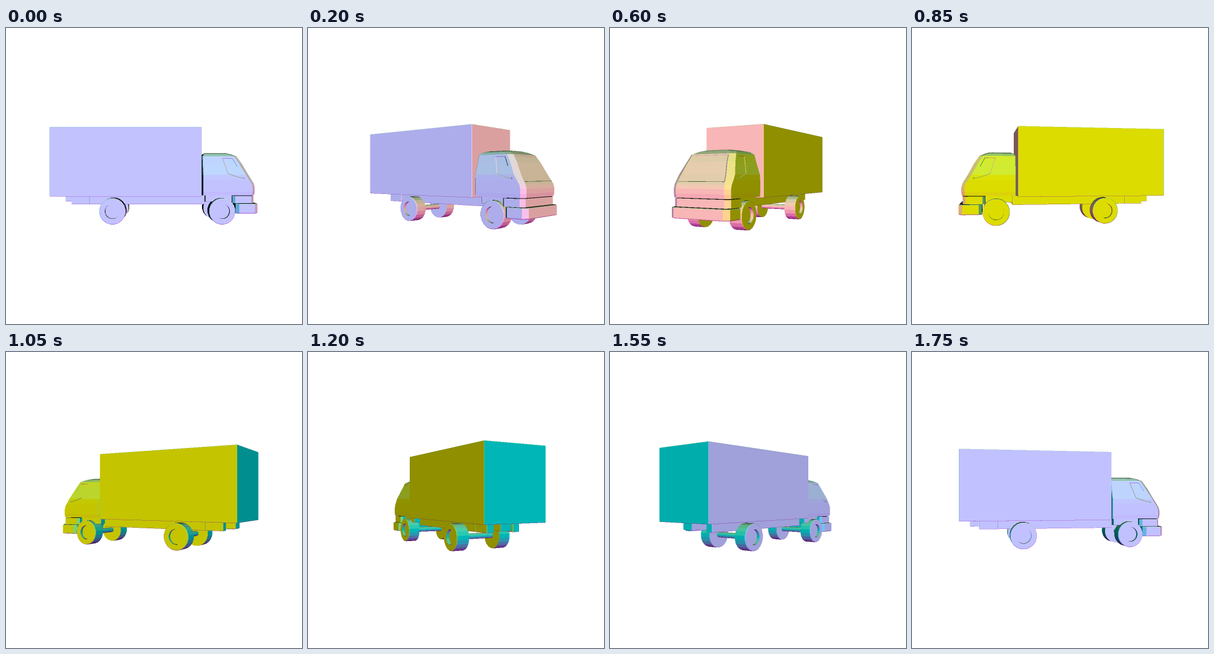
Recreate the animation shown at these times as an HTML page with a canvas. Size 512x512 px, loop 1800 ms.

```html
<!DOCTYPE html>
<html lang="en">
<head>
<meta charset="utf-8">
<title>Turning truck</title>
<style>
html, body { margin: 0; width: 100%; height: 100%; overflow: hidden; background: #fff; }
canvas { display: block; width: 512px; height: 512px; }
</style>
</head>
<body>
<canvas id="stage" width="512" height="512"></canvas>
<script>
const SIZE = 512, SS = 2, TOP = 130, ROWS = 240, DIST = 715;
const STEPS = 36, STEP_MS = 50;
const W = SIZE * SS, H = ROWS * SS;
const ctx = document.getElementById('stage').getContext('2d');
const depth = new Float32Array(W * H);
const color = new Uint32Array(W * H);
const faces = [];

// Model space: x to the front, y down, z to the right-hand side.
const dot = (a, b) => a[0] * b[0] + a[1] * b[1] + a[2] * b[2];
const sub = (a, b) => a.map((v, i) => v - b[i]);
const mul = (a, k) => a.map(v => v * k);
const sum = (a, b) => a.map((v, i) => v + b[i]);
const unit = a => mul(a, 1 / (Math.hypot(...a) || 1));
const cross = (a, b) => [
  a[1] * b[2] - a[2] * b[1],
  a[2] * b[0] - a[0] * b[2],
  a[0] * b[1] - a[1] * b[0]
];
const middle = pts => mul(pts.reduce(sum), 1 / pts.length);
const lerp = (a, b, t) => a + (b - a) * t;

function polyNormal(pts) {
  let n = [0, 0, 0];
  pts.forEach((p, i) => { n = sum(n, cross(p, pts[(i + 1) % pts.length])); });
  return unit(n);
}

// Adds a face whose normal points away from the inner point (or towards it).
function add(pts, inner, sign = 1) {
  const n = polyNormal(pts);
  const out = dot(n, sub(middle(pts), inner)) * sign;
  faces.push({ pts, n: out < 0 ? mul(n, -1) : n });
}

function box(x0, x1, y0, y1, z0, z1, bevel = 0.5) {
  const c = [(x0 + x1) / 2, (y0 + y1) / 2, (z0 + z1) / 2];
  const h = [(x1 - x0) / 2, (y1 - y0) / 2, (z1 - z0) / 2];
  const corner = (s, axis) => s.map((k, i) => c[i] + k * (h[i] - (i === axis ? 0 : bevel)));
  const ends = [-1, 1];
  for (let a = 0; a < 3; a++) {
    const u = (a + 1) % 3, w = (a + 2) % 3;
    const at = (i, j, k, axis) => {
      const s = [];
      s[a] = i; s[u] = j; s[w] = k;
      return corner(s, axis);
    };
    for (const i of ends) {
      add([at(i, -1, -1, a), at(i, 1, -1, a), at(i, 1, 1, a), at(i, -1, 1, a)], c);
      for (const j of ends)
        add([at(i, j, -1, a), at(i, j, 1, a), at(i, j, 1, u), at(i, j, -1, u)], c);
    }
  }
  for (const i of ends) for (const j of ends) for (const k of ends)
    add([0, 1, 2].map(axis => corner([i, j, k], axis)), c);
}

// Levels: [y, side z, side end x, front x, front z, back x]
function loft(levels, cut) {
  const rings = levels.map(([y, zs, xs, xf, zf, xb]) => {
    const half = [[xb, y, zs - cut], [xb + cut, y, zs], [xs, y, zs], [xf, y, zf]];
    return half.concat(half.map(([x, , z]) => [x, y, -z]).reverse());
  });
  const c = middle(rings.map(middle));
  rings.slice(1).forEach((ring, r) => {
    const low = rings[r];
    ring.forEach((p, i) => {
      const j = (i + 1) % ring.length;
      add([low[i], low[j], ring[j], p], c);
    });
  });
  add(rings[0], c);
  add(rings[rings.length - 1], c);
}

function wheel(x, side) {
  const y = 57, R = 21.4, rim = 12.2, N = 20;
  const c = [x, y, 36 * side];
  const at = (r, i, z) => {
    const a = (i + 0.5) * 2 * Math.PI / N;
    return [x + r * Math.cos(a), y + r * Math.sin(a), z * side];
  };
  const band = (r0, z0, r1, z1, sign) => {
    for (let i = 0; i < N; i++)
      add([at(r0, i, z0), at(r0, i + 1, z0), at(r1, i + 1, z1), at(r1, i, z1)], c, sign);
  };
  const disc = (r, z) => add(Array.from({ length: N }, (_, i) => at(r, i, z)), c);
  band(R, 28, R, 48.3);
  band(R, 48.3, R - 0.8, 49);
  band(R - 0.8, 49, rim, 49);
  band(rim, 49, rim, 44, -1);
  disc(rim, 44);
  disc(R, 28);
}

function axle(x) {
  const N = 12, r = 4.5, c = [x, 57, 0];
  const at = (i, z) => [x + r * Math.cos(i * 2 * Math.PI / N), 57 + r * Math.sin(i * 2 * Math.PI / N), z];
  for (let i = 0; i < N; i++) add([at(i, -28), at(i + 1, -28), at(i + 1, 28), at(i, 28)], c);
}

// Thin recessed rim around a window.
function rimLine(pts, outward, width) {
  let n = polyNormal(pts);
  if (dot(n, outward) < 0) n = mul(n, -1);
  const c = middle(pts);
  pts.forEach((p, i) => {
    const q = pts[(i + 1) % pts.length];
    let inward = unit(cross(n, sub(q, p)));
    if (dot(inward, sub(c, p)) < 0) inward = mul(inward, -1);
    const shift = mul(inward, width);
    faces.push({ pts: [p, q, sum(q, shift), sum(p, shift)], n: unit(sum(mul(n, 0.6), mul(inward, 0.8))) });
  });
}

const cab = [
  [31, 49.5, 158, 163, 41.5, 79],
  [25, 50, 158.5, 164, 42, 79],
  [18, 50, 158.5, 164, 42, 79],
  [12, 50, 157, 162.3, 42, 79],
  [6, 50, 153, 158.7, 41.5, 79],
  [-2, 49.5, 148, 154, 40, 79],
  [-20, 43.5, 138, 144.5, 35.5, 79],
  [-32, 40, 130.5, 136.5, 33, 79],
  [-36, 34, 121, 128, 28, 82],
  [-38.5, 20, 115, 121, 16, 86]
];

function cabAt(y, column) {
  const i = cab.findIndex((l, k) => k && l[0] <= y);
  const a = cab[i - 1], b = cab[i];
  return lerp(a[column], b[column], (y - a[0]) / (b[0] - a[0]));
}

function buildTruck() {
  box(-166.9, 76.3, -78.6, 32.8, -53.6, 53.6);
  loft(cab, 1);
  loft([[44, 49, 157, 162, 41, 127], [32, 49, 157, 162, 41, 127]], 4);
  loft([[60.5, 50, 161, 167, 42, 132], [59.5, 51, 162, 168, 43, 132],
        [45.5, 51, 162, 168, 43, 132], [44.5, 50, 161, 167, 42, 132]], 5);
  box(84, 127, 31, 42, -40, 40);
  for (const s of [-1, 1]) {
    const [z0, z1] = s > 0 ? [17, 29] : [-29, -17];
    box(-137, -107, 32, 47, z0, z1);
    box(-107, 84, 32, 47, z0, z1);
    wheel(110, s);
    wheel(-67, s);
    const pane = [[111, -29], [128, -29], [146, 4.5], [134, 2], [119, -3.5]];
    rimLine(pane.map(([x, y]) => [x, y, s * (cabAt(y, 1) + 0.5)]), [0, 0, s], 0.9);
  }
  box(-152, -138, 32, 44, -16, 3);
  axle(110);
  axle(-67);
  const ys = [8, 6, -2, -20, -30];
  const shield = z => ys.map(y => [cabAt(y, 3) + 0.6, y, z * (cabAt(y, 4) - 1)]);
  rimLine(shield(1).concat(shield(-1).reverse()), [1, 0, 0], 0.7);
}

// Linear light to a display value.
function encode(v) {
  const c = Math.min(1, v);
  return Math.round(255 * (c < 0.0031308 ? 12.92 * c : 1.055 * c ** (1 / 2.4) - 0.055));
}

// Surface direction gives the hue, facing the viewer gives the brightness.
function shade(n, facing) {
  const f = Math.max(0, facing);
  const glow = 0.4 * Math.max(0, -n[2]) * f ** 6;
  const light = 0.005 + 1.08 * f + glow;
  const [r, g, b] = [n[0], -n[1], n[2]].map(v => encode(light * (v + 1) / 2));
  return r | g << 8 | b << 16;
}

function triangle(a, b, c, rgb) {
  const area = (b[0] - a[0]) * (c[1] - a[1]) - (b[1] - a[1]) * (c[0] - a[0]);
  if (Math.abs(area) < 1e-6) return;
  const x0 = Math.max(0, Math.floor(Math.min(a[0], b[0], c[0])));
  const x1 = Math.min(W - 1, Math.ceil(Math.max(a[0], b[0], c[0])));
  const y0 = Math.max(0, Math.floor(Math.min(a[1], b[1], c[1])));
  const y1 = Math.min(H - 1, Math.ceil(Math.max(a[1], b[1], c[1])));
  for (let y = y0; y <= y1; y++) {
    const py = y + 0.5;
    for (let x = x0; x <= x1; x++) {
      const px = x + 0.5;
      const u = ((b[0] - px) * (c[1] - py) - (b[1] - py) * (c[0] - px)) / area;
      const v = ((c[0] - px) * (a[1] - py) - (c[1] - py) * (a[0] - px)) / area;
      const w = 1 - u - v;
      if (u < -1e-6 || v < -1e-6 || w < -1e-6) continue;
      const d = u * a[2] + v * b[2] + w * c[2], k = y * W + x;
      if (d > depth[k]) { depth[k] = d; color[k] = rgb; }
    }
  }
}

function render(angle) {
  const cos = Math.cos(angle), sin = Math.sin(angle);
  const turn = ([x, y, z]) => [x * cos - z * sin, y, x * sin + z * cos];
  const project = ([x, y, z]) => {
    const s = DIST / (DIST - z);
    return [(SIZE / 2 + x * s) * SS, (SIZE / 2 + y * s - TOP) * SS, s];
  };
  depth.fill(0);
  color.fill(0xffffff);
  for (const f of faces) {
    const pts = f.pts.map(turn), n = turn(f.n);
    if (dot(n, sub([0, 0, DIST], pts[0])) <= 0) continue;
    const rgb = shade(f.n, n[2]), flat = pts.map(project);
    for (let i = 2; i < flat.length; i++) triangle(flat[0], flat[i - 1], flat[i], rgb);
  }
  const image = ctx.createImageData(SIZE, ROWS), out = image.data;
  for (let y = 0, o = 0; y < ROWS; y++) {
    for (let x = 0; x < SIZE; x++, o += 4) {
      let r = 0, g = 0, b = 0;
      for (let j = 0; j < SS; j++) for (let i = 0; i < SS; i++) {
        const c = color[(y * SS + j) * W + x * SS + i];
        r += c & 255; g += c >> 8 & 255; b += c >> 16 & 255;
      }
      out[o] = r / (SS * SS);
      out[o + 1] = g / (SS * SS);
      out[o + 2] = b / (SS * SS);
      out[o + 3] = 255;
    }
  }
  return image;
}

buildTruck();
ctx.fillStyle = '#fff';
ctx.fillRect(0, 0, SIZE, SIZE);

const views = [];
const start = performance.now();
let shown = -1;

function draw() {
  const step = Math.floor((performance.now() - start) / STEP_MS) % STEPS;
  if (step !== shown) {
    views[step] = views[step] || render(step * 2 * Math.PI / STEPS);
    ctx.putImageData(views[step], 0, TOP);
    shown = step;
  }
  requestAnimationFrame(draw);
}
draw();
</script>
</body>
</html>
```
